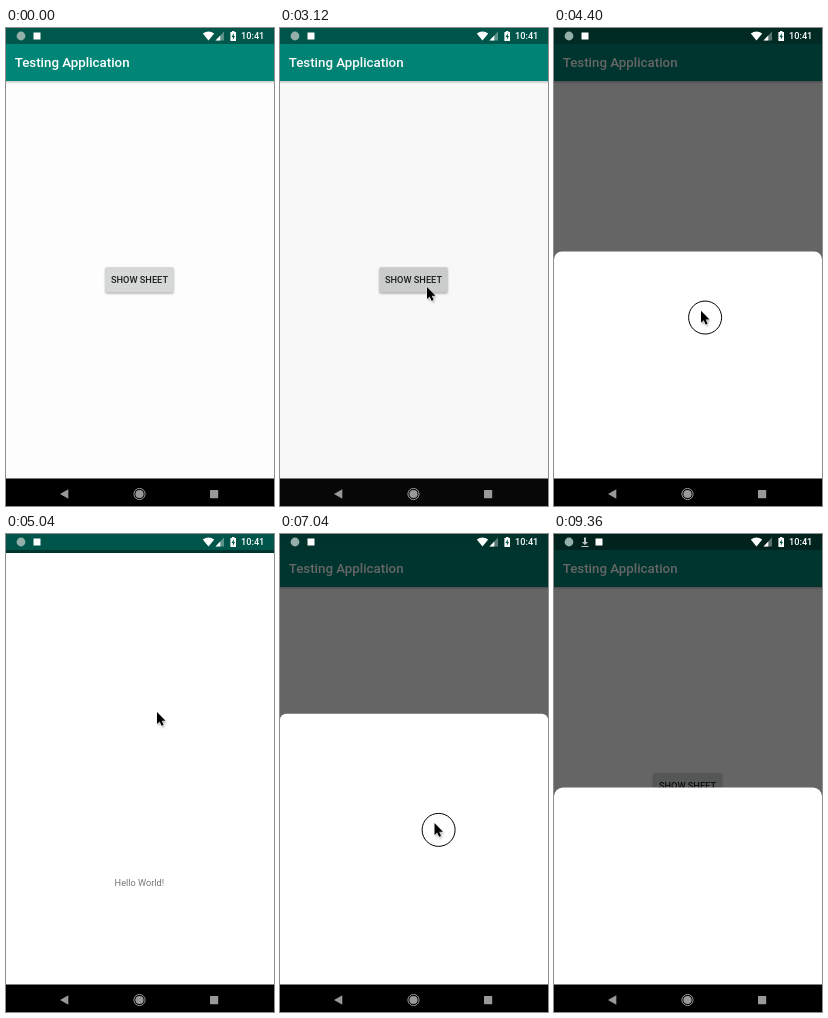
Animation, 268 px wide and 478 px high, one loop 9440 ms. Source, as an HTML page:

```html
<!DOCTYPE html>
<html lang="en">
<head>
<meta charset="utf-8">
<title>Bottom sheet demo</title>
<style>
  html, body { margin: 0; width: 100%; height: 100%; overflow: hidden; background: #fff; }
  svg { display: block; width: 100vw; height: 100vh; }
  text { font-family: Roboto, "Open Sans", sans-serif; }
  .medium { font-weight: 500; }
</style>
</head>
<body>
<svg viewBox="0 0 268 478">
  <defs>
    <linearGradient id="barShadow" x2="0" y2="1">
      <stop offset="0" stop-opacity=".22"/>
      <stop offset="1" stop-opacity="0"/>
    </linearGradient>
    <filter id="soft" x="-50%" y="-50%" width="200%" height="200%">
      <feGaussianBlur stdDeviation=".9"/>
    </filter>
    <path id="arrow" d="M0 0V13.4L3 10.6 5.1 15.4 7.3 14.5 5.2 9.8H9.4Z" transform="scale(.9)"/>
  </defs>

  <!-- Activity -->
  <rect width="268" height="478" fill="#fdfdfd"/>
  <rect y="53" width="268" height="3" fill="url(#barShadow)"/>
  <rect y="16" width="268" height="37" fill="#008577"/>
  <rect width="268" height="16" fill="#00574b"/>
  <text class="medium" x="8.7" y="39.3" font-size="13.3" fill="#fff">Testing Application</text>
  <rect x="99.5" y="240.2" width="68" height="25.3" rx="1.3" opacity=".35" filter="url(#soft)"/>
  <rect id="button" x="99.5" y="239.3" width="68" height="25.2" rx="1.3" fill="#d6d7d7"/>
  <text class="medium" x="133.5" y="255.2" font-size="9.2" text-anchor="middle" fill="#1c1c1c">SHOW SHEET</text>
  <rect y="450.5" width="268" height="28"/>
  <rect id="scrim" width="268" height="478"/>

  <!-- Sheet window -->
  <g id="window">
    <rect id="statusTint" width="268" height="16" fill="#00574b"/>
    <g id="sheet">
      <rect id="panel" width="268" height="620" fill="#fff"/>
      <text x="133.4" y="333" font-size="9.2" text-anchor="middle" fill="#757575">Hello World!</text>
    </g>
    <rect y="450.5" width="268" height="100"/>
  </g>

  <!-- System icons -->
  <g fill="#fff">
    <circle cx="15" cy="8" r="4.4" fill="#94aea9"/>
    <path id="download" d="M30 3.5h2V8h2L31 11 28 8h2ZM27.5 12h7v1h-7Z" opacity=".75"/>
    <rect id="appIcon" x="27.5" y="4.5" width="7" height="7"/>
    <path d="M196.8 5.6Q202.5 1.2 208.2 5.6L202.5 12.6Z"/>
    <path d="M218 3.5V12.5H209.5Z" opacity=".35"/>
    <path d="M214.3 7.5V12.5H209.5Z"/>
    <path d="M226 3h2.4v1h1.6v9h-5.6V4h1.6Z"/>
    <path d="M227.8 5.2 225.5 9h1.4v2.7L229 8h-1.2Z" fill="#00574b"/>
    <text class="medium" x="235" y="11.3" font-size="9.2">10:41</text>
  </g>
  <g fill="#999">
    <path d="M54 466 62.3 461.3V470.7Z"/>
    <circle cx="133.5" cy="466" r="4.1"/>
    <circle cx="133.5" cy="466" r="5.6" fill="none" stroke="#999"/>
    <rect x="204" y="462" width="8.2" height="8.2" rx=".6"/>
  </g>

  <g id="pointer">
    <circle id="touch" cx="4.1" cy="6.9" r="16.5" fill="none" stroke="#000"/>
    <use href="#arrow" x="1" y="2" opacity=".35" filter="url(#soft)"/>
    <use href="#arrow" stroke="#fff" stroke-width=".8" paint-order="stroke"/>
  </g>
</svg>
<script>
  const LOOP = 9440, STEP = 80;
  const PEEK = 253.5, EXPANDED = 16, CORNER = 9;
  const $ = id => document.getElementById(id);
  const progress = (t, a, b) => Math.min(1, Math.max(0, (t - a) / (b - a || 1)));
  const ease = (t, a, b) => {
    const k = progress(t, a, b);
    return k * k * (3 - 2 * k);
  };

  // Each move eases on from wherever the last one ended.
  const entry = { x: 193, y: 416 };
  const moves = [
    { start: 80, end: 800, x: 146, y: 255 },
    { start: 1040, end: 1360, x: 142, y: 282 },
    { start: 2080, end: 2400, x: 147, y: 259 },
    { start: 2800, end: 2800, x: 147, y: 259, press: true },
    { start: 3760, end: 4080, x: 145, y: 335 },
    { start: 4160, end: 4780, x: 151, y: 178, press: true },
    { start: 5440, end: 5840, x: 154.5, y: 110 },
    { start: 6080, end: 6160, x: 154.5, y: 90 },
    { start: 6320, end: 7210, x: 154.5, y: 310, press: true },
    { start: 7600, end: 8000, x: 150, y: 290 },
    { start: 8400, end: 8880, x: 165, y: 478 }
  ];
  const enters = moves[0].start, leaves = moves[moves.length - 1].end;

  function pointerAt(t) {
    let { x, y } = entry;
    for (const move of moves) {
      const k = ease(t, move.start, move.end);
      x += (move.x - x) * k;
      y += (move.y - y) * k;
    }
    return { x, y };
  }

  const isPressed = t =>
    moves.some(m => m.press && t >= m.start - STEP && t < m.end + STEP);

  const set = (id, name, value) => $(id).setAttribute(name, value);
  const show = (id, on) => set(id, "display", on ? "inline" : "none");

  function render(t) {
    const enter = progress(t, 3104, 3664);
    set("window", "opacity", enter);
    set("window", "transform", `translate(0 ${478 * 0.2 * (1 - enter)})`);
    set("scrim", "opacity", 0.6 * progress(t, 3104, 3574));
    set("button", "fill", t >= 2880 && t < 3600 ? "#cecfcf" : "#d6d7d7");

    const slide = ease(t, 4200, 5100) - ease(t, 6430, 7400);
    set("sheet", "transform", `translate(0 ${PEEK + (EXPANDED - PEEK) * slide})`);
    set("panel", "rx", CORNER * (1 - slide));
    set("statusTint", "opacity", slide);

    const { x, y } = pointerAt(t);
    set("pointer", "transform", `translate(${x} ${y})`);
    show("pointer", t > enters && t < leaves);
    show("touch", isPressed(t));

    const downloading = t >= 9280;
    show("download", downloading);
    set("appIcon", "x", downloading ? 41.5 : 27.5);
  }

  const start = performance.now();
  function frame() {
    const t = (performance.now() - start) % LOOP;
    render(Math.floor(t / STEP) * STEP);
    requestAnimationFrame(frame);
  }
  frame();
</script>
</body>
</html>
```
